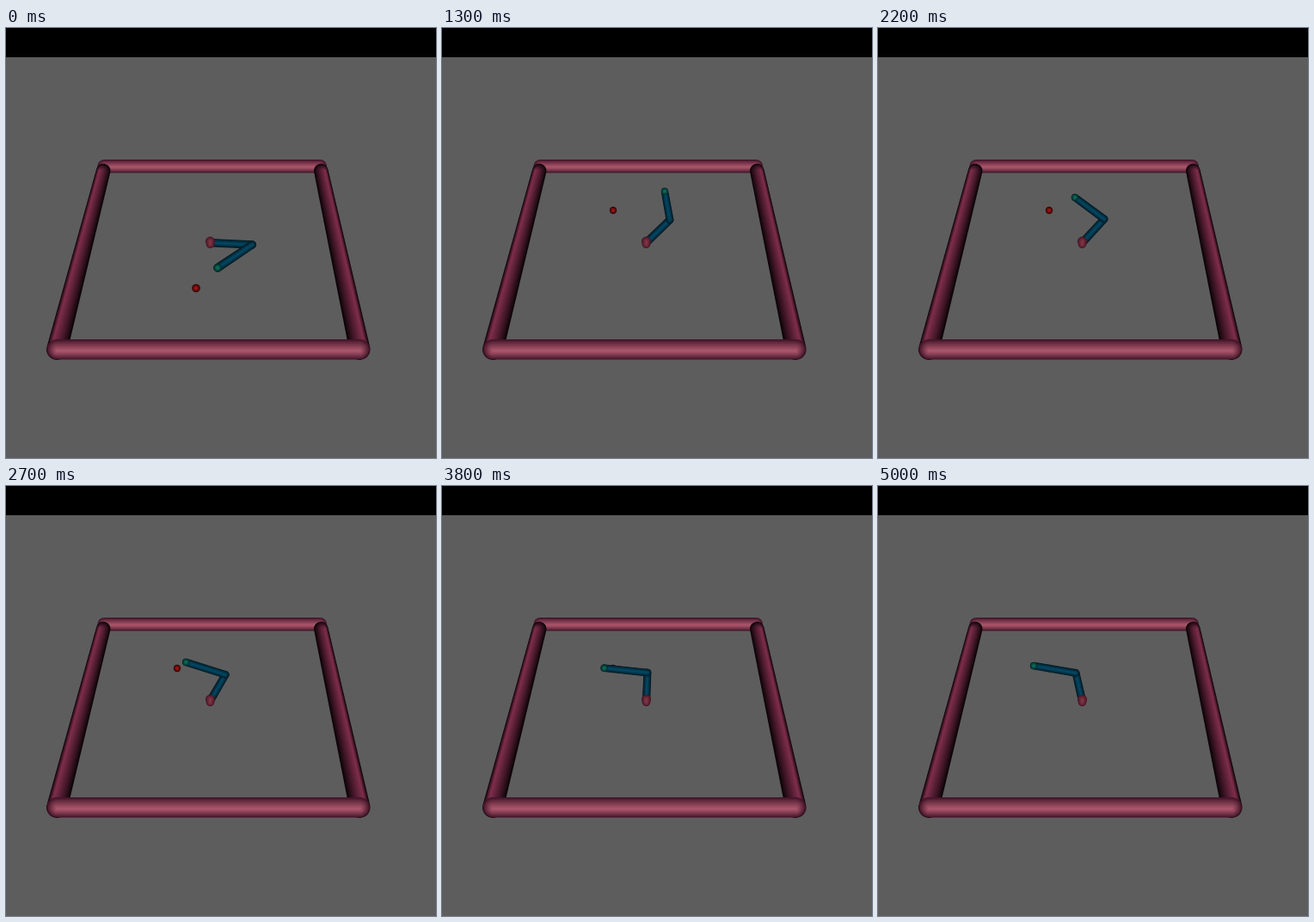
These frames come from a looping animation (500 by 500 pixels, 5.1 s). An HTML page with a canvas:

```html
<!DOCTYPE html>
<html>
<head>
<meta charset="utf-8">
<style>
html, body { margin: 0; width: 100%; height: 100%; overflow: hidden; background: #000; }
canvas { display: block; }
</style>
</head>
<body>
<canvas id="stage" width="500" height="500"></canvas>
<script>
const ctx = document.getElementById('stage').getContext('2d');
const LOOP = 5100, STEP = 100, LINK = 0.1, FOREARM = 0.1113;

// [time, upper link angle, forearm angle], degrees in the floor plane
const POSES = [
  [100, 1, 1], [600, 14.2, 24.6], [1300, 53.9, 95.2], [2200, 56.8, 131.6],
  [3200, 80.8, 169.2], [4300, 93.1, 171.6], [5000, 99.3, 165.7]
];
const LAST_POSE = [-3.7, -138.2];

const RAIL = [[66, 20, 40], [168, 84, 106]];
const SIDE = [[14, 4, 8], [122, 44, 72]];
const ARM = [[4, 24, 32], [3, 72, 100]];
const TIP = [[4, 42, 42], [18, 118, 96]];
const TARGET = [[42, 4, 4], [175, 24, 22]];
const BASE = [[70, 22, 38], [128, 54, 70]];

// Perspective view of a floor point
function project(x, y) {
  const scale = 1 / (0.0020537 + 0.0011483 * y);
  return { x: 237.5 + scale * x, y: -367.7 + 1.268 * scale, scale };
}

// Tapered round rod, shaded by nested layers that drift towards the light
function rod(a, b, ra, rb, [dark, light], dx = 0, dy = 0) {
  const angle = Math.atan2(b.y - a.y, b.x - a.x), q = Math.PI / 2;
  for (let i = 0; i < 9; i++) {
    const k = i / 9, r1 = ra * (1 - k), r2 = rb * (1 - k);
    const mix = Math.pow(i / 8, 0.85);
    ctx.fillStyle = `rgb(${dark.map((c, n) => Math.round(c + (light[n] - c) * mix))})`;
    ctx.beginPath();
    ctx.arc(b.x + dx * k * rb, b.y + dy * k * rb, r2, angle - q, angle + q);
    ctx.arc(a.x + dx * k * ra, a.y + dy * k * ra, r1, angle + q, angle + 3 * q);
    ctx.fill();
  }
}

const ball = (p, r, tones) => rod(p, p, r, r, tones);

const secant = (i, j) => (POSES[i + 1][j] - POSES[i][j]) / (POSES[i + 1][0] - POSES[i][0]);

function slope(i, j) {
  if (i === 0) return secant(0, j);
  if (i === POSES.length - 1) return secant(i - 1, j);
  const a = secant(i - 1, j), b = secant(i, j);
  return a * b > 0 ? 2 * a * b / (a + b) : 0;
}

// Monotone cubic through the poses
function poseAt(t) {
  if (t < STEP) return LAST_POSE;
  let i = 0;
  while (i < POSES.length - 2 && t >= POSES[i + 1][0]) i++;
  const p = POSES[i], n = POSES[i + 1], h = n[0] - p[0], u = (t - p[0]) / h;
  return [1, 2].map(j => {
    const d = n[j] - p[j], m0 = slope(i, j) * h, m1 = slope(i + 1, j) * h;
    return p[j] + u * (m0 + u * (3 * d - 2 * m0 - m1 + u * (m0 + m1 - 2 * d)));
  });
}

function drawArena() {
  ctx.fillStyle = '#000';
  ctx.fillRect(0, 0, 500, 34);
  ctx.fillStyle = '#5d5d5d';
  ctx.fillRect(0, 34, 500, 466);
  const bl = { x: 59.3, y: 373.7 }, br = { x: 411.3, y: 373.7 };
  rod({ x: 114.3, y: 160.8 }, { x: 365.2, y: 160.8 }, 7.8, 7.8, RAIL, 0, 0.1);
  rod({ x: 113.2, y: 166 }, bl, 8.3, 12.2, SIDE, -0.6);
  rod({ x: 366.3, y: 166 }, br, 8.3, 12.2, SIDE, 0.6);
  rod(bl, br, 11.8, 11.8, RAIL, 0, 0.15);
}

function drawArm([upper, fore]) {
  const rad = Math.PI / 180;
  const x = LINK * Math.cos(upper * rad), y = LINK * Math.sin(upper * rad);
  const root = project(0, 0), elbow = project(x, y);
  const tip = project(x + FOREARM * Math.cos(fore * rad), y + FOREARM * Math.sin(fore * rad));
  const radius = p => p.scale * 0.0096;
  rod(root, elbow, radius(root), radius(elbow), ARM);
  rod(elbow, tip, radius(elbow), radius(tip), ARM);
  ball(tip, radius(tip) * 0.95, TIP);
  rod({ x: 237.5, y: 248.2 }, { x: 237.5, y: 251.4 }, 5.6, 4.8, BASE);
}

function draw(now) {
  const t = Math.floor(now % LOOP / STEP) * STEP;
  drawArena();
  ball(t < STEP ? { x: 221, y: 302.5 } : { x: 199, y: 212 }, t < STEP ? 4.8 : 4.2, TARGET);
  drawArm(poseAt(t));
}

const start = performance.now();
function tick() {
  draw(performance.now() - start);
  requestAnimationFrame(tick);
}
tick();
</script>
</body>
</html>
```
